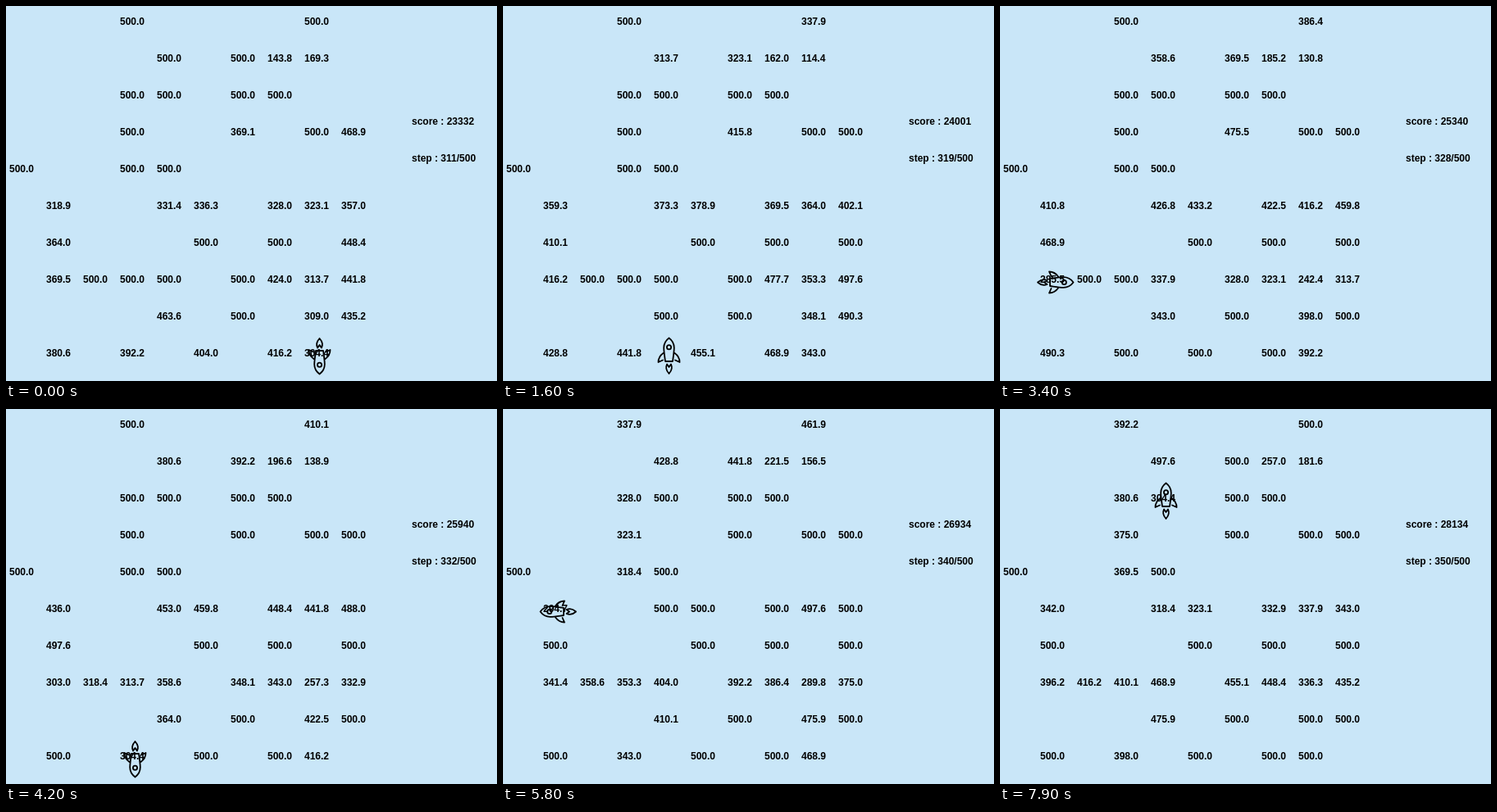
An HTML page with a canvas for the animation above (8000 ms loop, 599x458 px).

```html
<!DOCTYPE html>
<html lang="en">
<head>
<meta charset="utf-8">
<title>Rocket grid</title>
<style>
  html, body { margin: 0; width: 100%; height: 100%; overflow: hidden; background: #c9e6f8; }
  canvas { display: block; }
</style>
</head>
<body>
<canvas id="stage" width="599" height="458"></canvas>
<script>
const ctx = document.getElementById('stage').getContext('2d');
const CELL = 45, SIZE = 10, CAP = 500, GROWTH = 1.015, TAKE = 0.4;
const LOOP = 8000, FIRST_STEP = 311;

// '-' is empty; numbers below 50 count growth steps since a full cell was harvested.
const START = `
  -   -   -   500 -      -       -      -       500     -
  -   -   -   -   500    -       500    143.845 169.376 -
  -   -   -   500 500    -       500    500     -       -
  -   -   -   500 -      -       369.19 -       500     30
  500 -   -   500 500    -       -      -       -       -
  - 318.98 -  -   331.42 336.375 -      6       5       357.02
  -   13  -   -   -      500     -      500     -       27
  -   14  500 500 500    -       500    424.08  3       26
  -   -   -   -   463.65 -       500    -       2       25
  -   16  -   18  -      20      -      22      1       -`;

// Legs as [dx, dy, moves]
const LEGS = [[0, 1, 2], [-1, 0, 4], [0, -1, 4], [1, 0, 9], [0, 1, 8], [-1, 0, 9], [0, -1, 3]];

const parse = s => s === '-' ? null : s < 50 ? CAP * (1 - TAKE) * GROWTH ** s : +s;
const wrap = n => (n + SIZE) % SIZE;

function simulate() {
  let cells = START.trim().split(/\s+/).map(parse);
  let x = 8, y = 9, score = 23332.3;
  const states = [{ cells, x, y, score, dx: 0, dy: 1 }];
  LEGS.forEach(([dx, dy, moves], leg) => {
    for (let i = 0; i < moves; i++) {
      x = wrap(x + dx);
      y = wrap(y + dy);
      cells = cells.slice();
      const at = y * SIZE + x;
      const turning = leg > 0 && i === 0;  // a turning move harvests nothing
      if (cells[at] !== null && !turning) {
        score += cells[at] * TAKE;
        cells[at] *= 1 - TAKE;
      }
      cells = cells.map(v => v === null ? v : Math.min(CAP, v * GROWTH));
      states.push({ cells, x, y, score, dx, dy });
    }
  });
  return states;
}

function stepAt(t) {
  if (t < 100) return 0;
  if (t < 400) return 1;
  if (t < 7100) return Math.min(34, 2 + Math.floor((t - 400) / 200));
  return 35 + Math.floor((t - 7100) / 200);
}

const rocket = new Path2D(`
  M0 -22 C-4 -19 -6.3 -15 -6.3 -10 C-6.2 -5 -5.2 1 -4.5 6.5
  H4.5 C5.2 1 6.2 -5 6.3 -10 C6.3 -15 4 -19 0 -22 Z
  M2.6 -10.8 A2.6 2.6 0 1 1 -2.6 -10.8 A2.6 2.6 0 1 1 2.6 -10.8 Z
  M-7 -3.5 C-10.5 -1 -13 2.5 -13 7.5 L-7.5 5
  M7 -3.5 C10.5 -1 13 2.5 13 7.5 L7.5 5
  M-2.4 10 C-4.4 14 -3.2 18 0 21.5 C3.2 18 4.4 14 2.4 10 L0 13.5 Z`);

function drawRocket({ x, y, dx, dy }) {
  ctx.save();
  ctx.translate((x + 0.5) * CELL, (y + 0.5) * CELL);
  ctx.rotate(Math.atan2(dx, -dy));
  ctx.lineWidth = 1.8;
  ctx.lineJoin = ctx.lineCap = 'round';
  ctx.stroke(rocket);
  ctx.restore();
}

const states = simulate();

function draw(t) {
  const i = stepAt(t), s = states[i];
  ctx.fillStyle = '#c9e6f8';
  ctx.fillRect(0, 0, 599, 458);
  ctx.fillStyle = ctx.strokeStyle = '#000';
  ctx.font = 'bold 12px "Liberation Sans", Arial, Helvetica, sans-serif';
  s.cells.forEach((v, n) => {
    if (v === null) return;
    const text = (Math.floor(v * 10) / 10).toFixed(1);
    ctx.fillText(text, n % SIZE * CELL + 4, Math.floor(n / SIZE) * CELL + 23);
  });
  ctx.fillText(`score : ${Math.floor(s.score)}`, 495, 145);
  ctx.fillText(`step : ${FIRST_STEP + i}/500`, 495, 190);
  drawRocket(s);
}

function tick() {
  draw(performance.now() % LOOP);
  requestAnimationFrame(tick);
}
tick();
</script>
</body>
</html>
```
